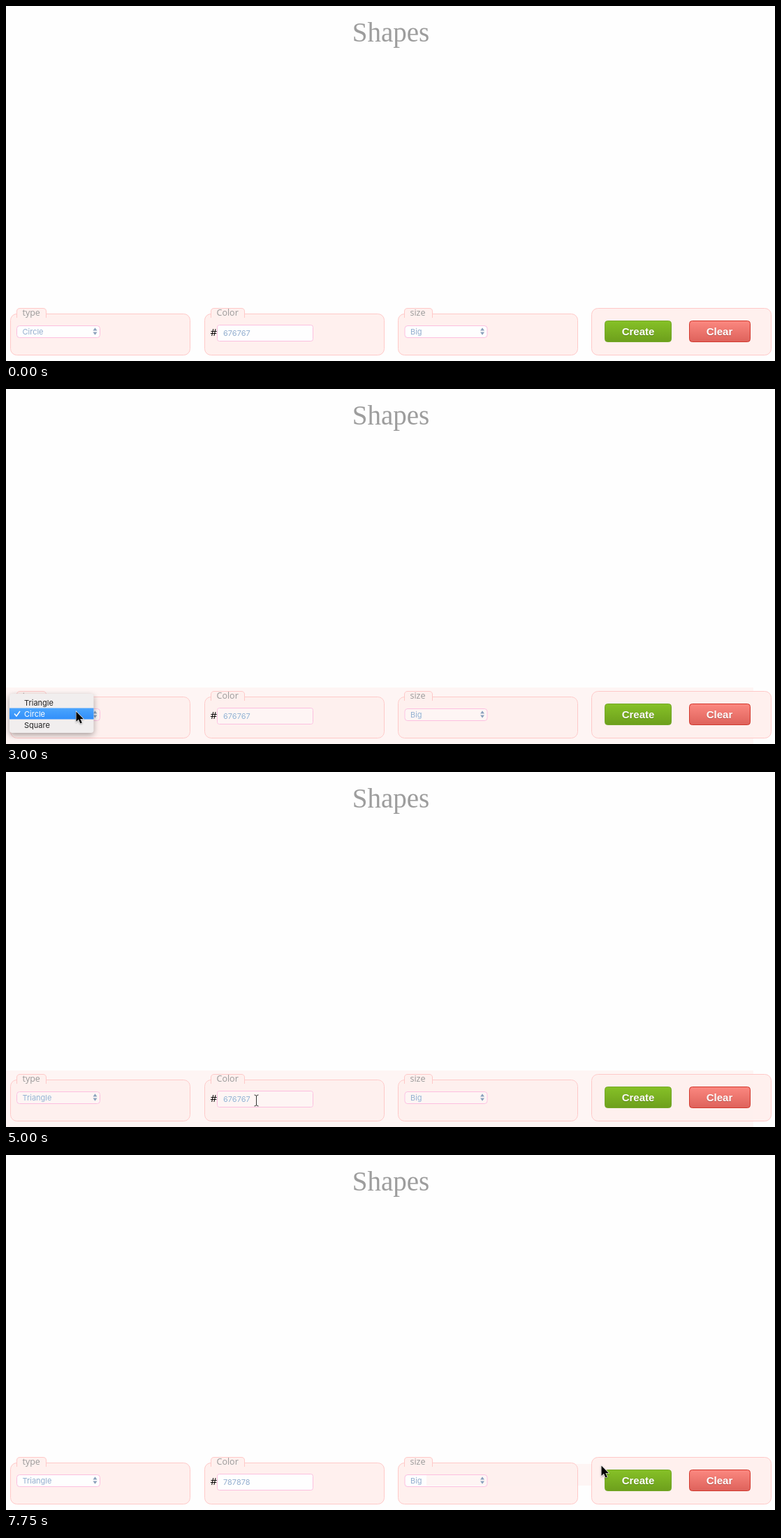
Recreate the animation shown at these times as an HTML page. Size 1101 by 509 pixels, loop 8 s.

```html
<!DOCTYPE html>
<html lang="en">
<head>
<meta charset="utf-8">
<title>Shapes</title>
<style>
  html, body { margin: 0; width: 100%; height: 100%; overflow: hidden; background: #fefefe; }
  svg { display: block; width: 1101px; height: 509px; font: 11px Inter, sans-serif; }
  .title { font: 39px "Liberation Serif", serif; fill: #9d9d9d; text-anchor: middle; }
  .panel { fill: #fff0ee; stroke: #ffc9c8; }
  .legend { font: 12.5px "Open Sans", sans-serif; fill: #999; }
  .hash { font: 15px "Open Sans", sans-serif; }
  .field { fill: #fefefe; stroke: #fcbfdf; }
  .value { fill: #93aecf; }
  .arrows { fill: #8ba0bb; }
  .button { font: bold 15px "Liberation Sans", sans-serif; fill: #fff; text-anchor: middle; text-shadow: 0 1px 1px #0003; }
  #tint { fill: #fef5f4; mix-blend-mode: darken; }
  #menu { filter: drop-shadow(0 3px 4px #0005); }
  #pointer { filter: drop-shadow(0 1px 1px #0005); }
</style>
</head>
<body>
<svg viewBox="0 0 1101 509">
  <defs>
    <linearGradient id="green" x2="0" y2="1"><stop stop-color="#86c127"/><stop offset="1" stop-color="#6d9f1c"/></linearGradient>
    <linearGradient id="red" x2="0" y2="1"><stop stop-color="#fb8880"/><stop offset="1" stop-color="#de625b"/></linearGradient>
    <linearGradient id="blue" x2="0" y2="1"><stop stop-color="#4ba5fd"/><stop offset="1" stop-color="#318ffa"/></linearGradient>
  </defs>
  <text class="title" x="551" y="51">Shapes</text>

  <g id="panels"></g>
  <rect class="panel" x="838.5" y="433.5" width="257" height="67" rx="9"/>
  <text class="hash" x="292.5" y="473">#</text>
  <rect class="field" x="302.5" y="457.5" width="137" height="23" rx="3"/>
  <rect id="selection" x="311" y="462" width="40" height="14" fill="#b5d5fd"/>
  <text id="color" class="value" x="311" y="473"></text>
  <rect id="caret" y="463" width="1" height="13" fill="#7d97b8"/>
  <g id="selects"></g>

  <rect x="857.5" y="451.5" width="95" height="30" rx="4" fill="url(#green)" stroke="#74a728"/>
  <text class="button" x="905" y="472">Create</text>
  <rect id="ring" x="976.5" y="449.5" width="91" height="35" rx="3" fill="none" stroke="#80b5f8" stroke-width="3"/>
  <rect x="978.5" y="451.5" width="87" height="30" rx="4" fill="url(#red)" stroke="#d2382d"/>
  <text class="button" x="1021.5" y="472">Clear</text>

  <rect id="tint"/>

  <g id="menu">
    <rect x="5" y="437" width="120.500" height="56" rx="4" fill="#f1eeee"/>
    <rect id="highlight" x="5" width="120.500" height="16" fill="url(#blue)"/>
    <g id="items"></g>
    <path d="M12 465.500l3 3.500 5-7" fill="none" stroke-width="1.400" id="check"/>
  </g>

  <path id="pointer" d="M0 0V14.500L3.400 11.300 5.900 17 8.300 16 5.800 10.500H10.300Z" stroke="#fff" stroke-width="1.200" paint-order="stroke"/>
  <path id="beam" d="M-3-8q3 0 3 2v12q0 2-3 2M3-8q-3 0-3 2v12q0 2 3 2" fill="none" stroke="#333"/>
</svg>

<script>
const $ = id => document.getElementById(id);
const show = (id, on) => $(id).style.display = on ? '' : 'none';
const place = (id, x, y) => $(id).setAttribute('transform', `translate(${x} ${y})`);

const panel = (x, label, tab) => `
  <rect class="panel" x="${x + .5}" y="441.5" width="257" height="59" rx="9"/>
  <path class="panel" d="M${x + 9.5} 447v-9q0-4.500 4.500-4.500h${tab - 9}q4.500 0 4.500 4.500v9"/>
  <text class="legend" x="${x + 17.5}" y="444">${label}</text>`;
$('panels').innerHTML = panel(6, 'type', 42) + panel(284, 'Color', 48) + panel(561, 'size', 40);

const select = (x, width, id, value) => `
  <rect class="field" x="${x + .5}" y="458.5" width="${width - 1}" height="17" rx="4"/>
  <text id="${id}" class="value" x="${x + 8.5}" y="470.5">${value}</text>
  <path class="arrows" d="M${x + width - 10.500} 465.500h6l-3-4.200zM${x + width - 10.500} 467.500h6l-3 4.200z"/>`;
$('selects').innerHTML = select(15, 120, 'type', 'Circle') + select(570.5, 119, 'size', 'Big');

$('items').innerHTML = ['Triangle', 'Circle', 'Square']
  .map((name, i) => `<text x="26" y="${453.5 + 16 * i}">${name}</text>`).join('');

// Each row: start time, then the values held until the next row.
const pointer = [
  [0], [500, 605.5, 46.5], [750, 526.5, 88.5], [1000, 324.5, 247.5], [1250, 289.5, 291.5],
  [1500, 157, 383], [1750, 102, 457], [2000, 100.5, 462.5], [3500, 98.5, 455], [3750, 98.5, 449],
  [4500, 300, 484], [4750, 339.5, 481.5], [5000], [5250, 253, 475.5], [5500, 252, 474.5],
  [7500, 603, 455], [7750, 852.5, 445.5]
];
const colors = [[0, '676767'], [6250, '78'], [6750, '7878'], [7000, '787878']];
const tints = [
  [0, 0, 0, 0, 0], [2250, 97, 446, 973, 41], [3000, 0, 428, 1070, 81],
  [7500, 0, 0, 0, 0], [7750, 602, 443, 236, 31]
];
const at = (rows, t) => rows.findLast(row => row[0] <= t).slice(1);

function draw(t) {
  const within = (from, to) => t >= from && t < to;

  const [x, y] = at(pointer, t);
  show('pointer', x !== undefined);
  if (x !== undefined) place('pointer', x, y);
  show('beam', within(5000, 5250));
  place('beam', 358.5, 471);

  const [left, top, width, height] = at(tints, t);
  Object.entries({ x: left, y: top, width, height })
    .forEach(([name, value]) => $('tint').setAttribute(name, value));

  const picked = t >= 3500 ? 0 : 1;
  show('menu', within(3000, 4250));
  $('menu').style.opacity = t < 4000 ? 1 : .5;
  $('highlight').setAttribute('y', 441.5 + 16 * picked);
  [...$('items').children].forEach((item, i) => item.setAttribute('fill', i === picked ? '#fff' : '#222'));
  $('check').setAttribute('stroke', picked === 1 ? '#fff' : '#222');

  $('type').textContent = t < 4500 ? 'Circle' : 'Triangle';
  $('color').textContent = at(colors, t)[0];
  show('selection', within(5250, 6250));
  show('caret', within(6250, 7500));
  $('caret').setAttribute('x', 311 + Math.round($('color').getComputedTextLength()));
  show('ring', within(2250, 3000));
}

function tick() {
  draw(performance.now() % 8000);
  requestAnimationFrame(tick);
}
tick();
</script>
</body>
</html>
```
